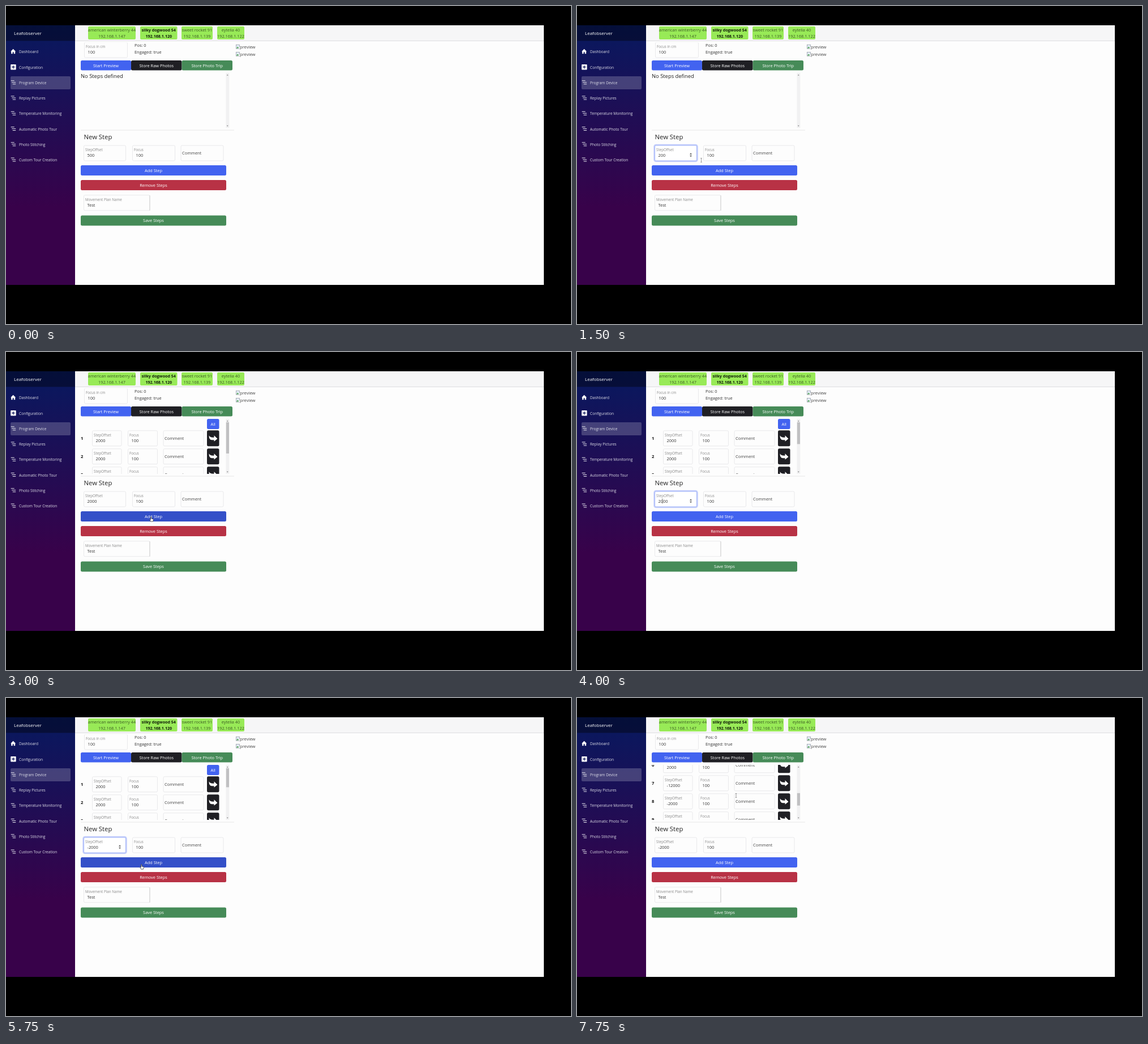
Recreate the animation shown at these times as an HTML page. Size 998 px wide and 561 px high, loop 8000 ms.

```html
<!DOCTYPE html>
<html lang="en">
<head>
<meta charset="utf-8">
<title>Program Device</title>
<style>
  html, body { margin: 0; width: 100%; height: 100%; overflow: hidden; background: #000; }
  svg { display: block; font-family: "Open Sans", "Noto Sans", sans-serif; }
  text { white-space: pre; }
</style>
</head>
<body>
<svg width="998" height="561" viewBox="0 0 998 561">
  <defs>
    <linearGradient id="side" x2="0" y2="1">
      <stop stop-color="#07195f"/><stop offset=".7" stop-color="#38024a"/>
    </linearGradient>
    <clipPath id="list"><rect x="128" y="118" width="260" height="97"/></clipPath>
  </defs>
  <g id="page"></g>
  <g id="live"></g>
</svg>
<script>
const STEP = 250, LOOP = 8000;
const BLUE = '#4263f0', BLUE_HOVER = '#3450c8', BLACK = '#1f1f24', GREEN = '#468b58', RED = '#b83245';
const LIST_TOP = 118, LIST_HEIGHT = 97, TRACK_TOP = 124, TRACK_HEIGHT = 84, ROW = 32;

const rect = (x, y, w, h, fill, r = 0, extra = '') =>
  `<rect x="${x}" y="${y}" width="${w}" height="${h}" rx="${r}" fill="${fill}" ${extra}/>`;
const path = (d, fill, extra = '') => `<path d="${d}" fill="${fill}" ${extra}/>`;
const at = (x, y, content) => `<g transform="translate(${x} ${y})">${content}</g>`;

// y is the optical middle of the line
const text = (x, y, content, size = 7.4, fill = '#333', extra = '') =>
  `<text x="${x}" y="${y + size * 0.36}" font-size="${size}" fill="${fill}" ${extra}>${content}</text>`;
const centred = (x, y, content, size, fill, extra = '') =>
  text(x, y, content, size, fill, 'text-anchor="middle" ' + extra);

const button = (x, y, w, h, label, fill) =>
  rect(x, y, w, h, fill, 2.5) + centred(x + w / 2, y + h / 2 + 0.3, label, 7.4, '#fff');

function field(x, middle, w, label, value, focused) {
  const box = focused
    ? rect(x - 0.5, middle - 14.5, w + 1, 29, '#fff', 3, 'stroke="#c6d0fb" stroke-width="2.5"') +
      rect(x + 0.5, middle - 13.5, w - 1, 27, '#fff', 2, 'stroke="#8fa5f6" stroke-width=".8"')
    : rect(x + 0.5, middle - 13.5, w - 1, 27, '#fdfdfd', 2, 'stroke="#e4e4e6" stroke-width=".8"');
  const content = value === undefined
    ? text(x + 2.5, middle, label, 7.4, '#444')
    : text(x + 3, middle - 5.3, label, 6.25, '#8a8a8a') + text(x + 6.5, middle + 4.2, value);
  return box + content;
}

function sidebar() {
  const items = ['Dashboard', 'Configuration', 'Program Device', 'Replay Pictures', 'Temperature Monitoring',
    'Automatic Photo Tour', 'Photo Stitching', 'Custom Tour Creation'];
  const house = path('M-4.500 0L0-4.500 4.500 0H3.500V4H1V1H-1V4H-3.500V0Z', '#fff');
  const plus = rect(-4.5, -4.5, 9.5, 9.5, '#fff', 1) +
    path('M.2-2.500V3M-2.500 .2H3', 'none', 'stroke="#0c1458" stroke-width="1.2"');
  const lines = path('M-4-3H2M-2.500 0H4.500M-1 3H4.500', 'none', 'stroke="#e8e8f0" stroke-width="1.1"');
  return rect(0, 34, 122, 458, 'url(#side)') +
    rect(0, 34, 122, 27.5, 'rgba(0,0,0,.4)') +
    text(14, 48, 'Leafobserver', 8, '#fff', 'font-weight="500"') +
    rect(8, 124, 106, 23, 'rgba(255,255,255,.2)', 2) +
    items.map((label, i) => {
      const y = 81 + i * 27.25;
      return at(12.7, y - 0.8, [house, plus][i] || lines) + text(23, y, label, 6.6, '#dcdce6');
    }).join('');
}

function header() {
  const chips = [
    [145, 84, 'american winterberry 44', 147],
    [237, 65.5, 'silky dogwood 54', 120],
    [310, 55, 'sweet rocket 91', 139],
    [373, 48, 'eytelia 40', 122]
  ];
  return rect(122, 34, 828, 27, '#f6f6f7') + rect(122, 61, 828, 0.8, '#d8d8da') +
    chips.map(([x, w, name, host], i) => {
      const active = i === 1;
      const line = (y, s) => centred(x + w / 2, y, s, active ? 7.1 : 7.35, active ? '#101c08' : '#3c5a24',
        active ? 'font-weight="700"' : '');
      return rect(x, 36, w, 23, '#98ea57', 2) + line(42.3, name) + line(53.8, '192.168.1.' + host);
    }).join('');
}

function page() {
  const preview = y => at(406, y - 4,
    rect(0.4, 0.4, 6.2, 6.8, '#e6effa', 0, 'stroke="#8d949c" stroke-width=".7"') +
    path('M1 6.500L3 3.500 6 6.500Z', '#57a55a') + path('M4 7L7 4V7Z', '#fff')) +
    text(413, y, 'preview', 7.6, '#444');
  return rect(122, 34, 828, 458, '#fdfdfd') + sidebar() + header() +
    field(138, 77.5, 77, 'Focus in cm', '100') + rect(137, 62, 79, 2.5, '#fdfdfd') +
    text(227, 69.5, 'Pos: 0') + text(227, 81.3, 'Engaged: true') +
    preview(72) + preview(85) +
    button(132, 96, 89, 17.5, 'Start Preview', BLUE) +
    button(221, 96, 89.5, 17.5, 'Store Raw Photos', BLACK) +
    button(310.5, 96, 89.5, 17.5, 'Store Photo Trip', GREEN) +
    rect(132, 218.7, 271, 0.7, '#dcdcde') +
    text(137.5, 231, 'New Step', 11.3, '#222', 'font-weight="500"') +
    field(223, 259.5, 76, 'Focus', '100') + field(308.5, 259.5, 76, 'Comment') +
    button(132, 307, 257, 18, 'Remove Steps', RED) +
    field(137, 347.2, 117.5, 'Movement Plan Name', 'Test') + rect(253.5, 334, 0.9, 27, '#ccc') +
    button(132, 369.5, 257, 18, 'Save Steps', GREEN);
}

const stepValue = i => i < 6 ? '2000' : i === 6 ? '-12000' : '-2000';

function stepRow(i, scroll) {
  const y = 152.3 + i * ROW - scroll;
  const arrow = path('M-7-5Q-5-1.500 0-1.500H2V-5L8 .7 2 5.500V3H-2Q-7 3-7-5Z', '#fff');
  return text(132, y, i + 1, 7.6, '#111', 'font-weight="700"') +
    field(152, y, 52.5, 'StepOffset', stepValue(i)) +
    field(215, y, 53, 'Focus', '100') +
    field(277.5, y, 72, 'Comment') +
    rect(355, y - 14, 21.5, 28, BLACK, 2.5) + at(365.5, y, arrow);
}

function stepList({ rows, scroll }) {
  const height = 20 + rows * ROW, ratio = TRACK_HEIGHT / height;
  const bar = rect(388.5, LIST_TOP, 5.8, LIST_HEIGHT, '#f1f1f2') +
    path('M389.800 122.500L391.200 120.700 392.600 122.500Z', '#777') +
    path('M389.800 210.800L391.200 212.600 392.600 210.800Z', '#777');
  if (!rows) return bar + text(132, 124, 'No Steps defined', 9.4, '#222', 'font-weight="500"');
  const content = Array.from({ length: rows }, (_, i) => stepRow(i, scroll)).join('');
  return `<g clip-path="url(#list)">${button(355, 118 - scroll, 21.5, 18, 'All', BLUE)}${content}</g>` +
    bar + rect(388.8, TRACK_TOP + scroll * ratio, 5.2, LIST_HEIGHT * ratio, '#c0c0c2');
}

const beam = 'M-1.300-3.500H1.300M0-3.500V3.500M-1.300 3.500H1.300';
const cursors = {
  none: '',
  beam: path(beam, 'none', 'stroke="#777" stroke-width=".7"'),
  arrow: path('M-2-4V4L0 2.300 1.300 5 2.400 4.500 1.200 2H3.500Z', '#fff', 'stroke="#222" stroke-width=".6"'),
  hand: path('M-1.500-4Q-.7-4.800 0-4V-1L3-.3Q3.600 0 3.300 1.500L2.500 4H-1.300L-3.300 1Q-3-.2-1.500 .8Z', '#fff',
    'stroke="#222" stroke-width=".7"')
};

// [tick, changes]: every entry stays in force until overridden
const timeline = [
  [0, { value: '500', rows: 0, scroll: 0, focus: false, hover: false, caret: false, cursor: 'none', x: 300, y: 330 }],
  [1, { cursor: 'arrow', x: 250, y: 275 }],
  [2, { cursor: 'beam', x: 165, y: 264, focus: true }],
  [4, { value: '2', x: 219.5, y: 272 }],
  [5, { value: '20' }],
  [6, { value: '200' }],
  [7, { value: '2000' }],
  [8, { cursor: 'hand', x: 252, y: 291, hover: true }],
  [9, { rows: 1, focus: false, x: 257, y: 295 }],
  [10, { rows: 2 }],
  [11, { rows: 3 }],
  [12, { rows: 4 }],
  [13, { rows: 5 }],
  [14, { rows: 6 }],
  [15, { cursor: 'beam', x: 190, y: 268, hover: false }],
  [16, { x: 151, y: 263, focus: true }],
  [17, { value: '-2000' }],
  [18, { value: '-12000' }],
  [19, { cursor: 'hand', x: 264, y: 291, hover: true, caret: true }],
  [20, { rows: 7, focus: false, caret: false }],
  [21, { cursor: 'beam', x: 154, y: 264, focus: true, hover: false }],
  [22, { value: '-2000' }],
  [23, { cursor: 'hand', x: 240, y: 298, hover: true }],
  [24, { rows: 8, focus: false, x: 230, y: 292 }],
  [25, { rows: 9, x: 221, y: 286 }],
  [26, { rows: 10 }],
  [28, { rows: 11 }],
  [29, { cursor: 'beam', x: 281, y: 172, hover: false }],
  [30, { scroll: 97 }],
  [31, { scroll: 194 }]
];

const stateAt = tick => Object.assign({}, ...timeline.filter(([start]) => start <= tick).map(entry => entry[1]));

function live(state) {
  const { value, focus, hover, caret, cursor, x, y } = state;
  const spinner = path('M199-.8L201-3 203-.8ZM199 1.200L201 3.400 203 1.200Z', '#444', 'transform="translate(0 262.600)"');
  return stepList(state) +
    field(137, 259.5, 75, 'StepOffset', value, focus) + (focus ? spinner : '') +
    button(132, 281, 257, 18, 'Add Step', hover ? BLUE_HOVER : BLUE) +
    (caret ? at(151, 262.5, cursors.beam) : '') +
    at(x, y, cursors[cursor]);
}

const liveLayer = document.getElementById('live');
document.getElementById('page').innerHTML = page();
let shown = -1;

function frame() {
  const tick = Math.floor(performance.now() % LOOP / STEP);
  if (tick !== shown) liveLayer.innerHTML = live(stateAt(shown = tick));
  requestAnimationFrame(frame);
}
frame();
</script>
</body>
</html>
```
